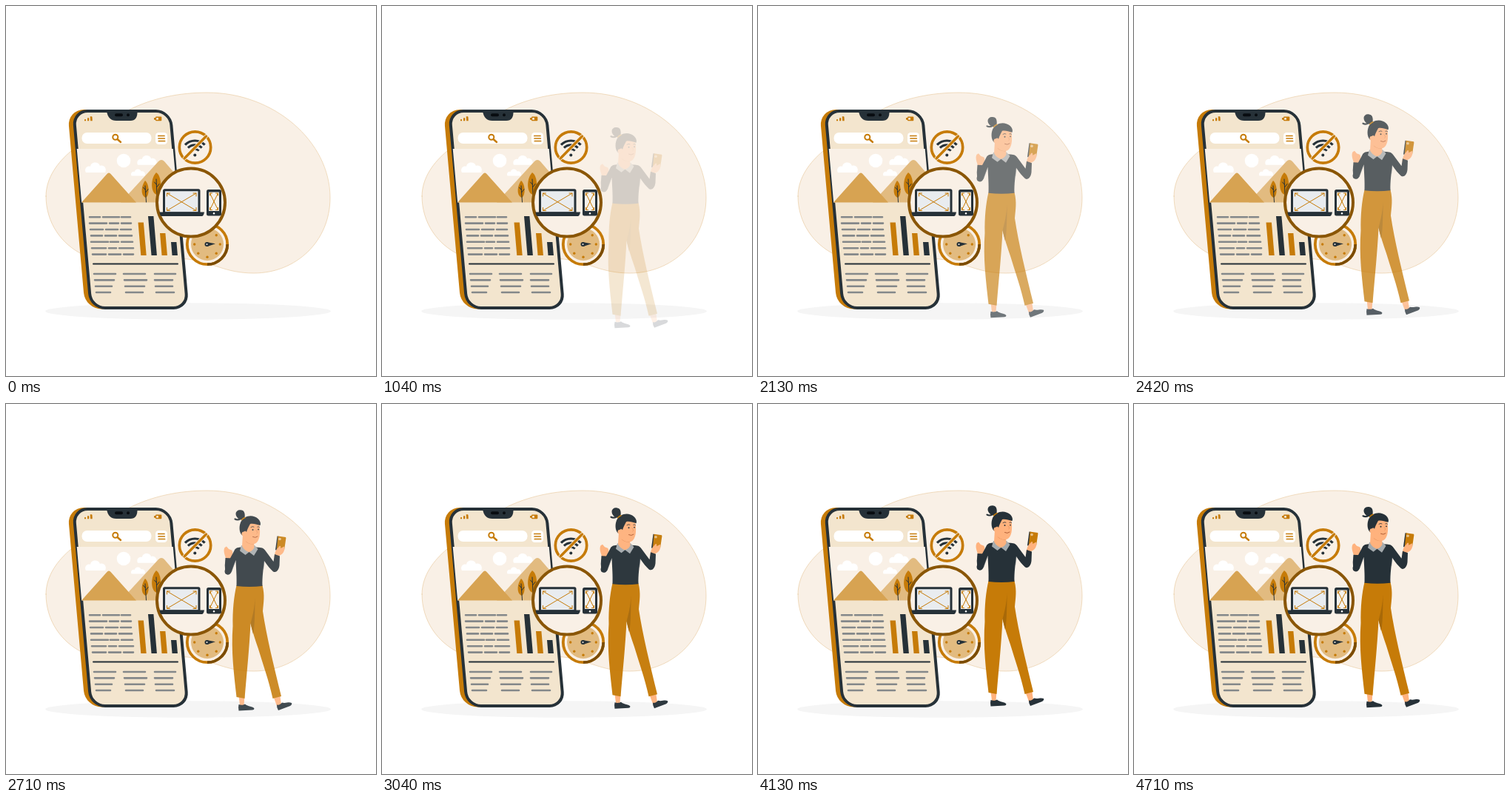
These frames come from a looping animation (500 by 500 pixels, 4750 ms). An HTML page:

```html
<!DOCTYPE html>
<html lang="en">
<head>
<meta charset="utf-8">
<title>Mobile site</title>
<style>
html, body { margin: 0; width: 100%; height: 100%; overflow: hidden; background: #fff; }
svg { display: block; width: 100vw; height: 100vh; }
</style>
</head>
<body>
<svg id="stage" viewBox="0 0 500 500" fill="none" stroke-linecap="round" stroke-linejoin="round"></svg>
<script>
const ORANGE = '#c67b08', DARK = '#263138', BROWN = '#8a5606', TAN = '#e2bb80',
      CREAM = '#f9f0e6', SAND = '#f3e5ce', GREY = '#84888a', SKIN = '#ffb27d';
const SKEW = 'matrix(1 0 .089 1 -12.46 0)';

const shape = (d, fill, extra = '') => `<path d="${d}" fill="${fill}" ${extra}/>`;
const line = (d, color, width, extra = '') =>
  `<path d="${d}" stroke="${color}" stroke-width="${width}" ${extra}/>`;
const disc = (x, y, r, fill, extra = '') => `<circle cx="${x}" cy="${y}" r="${r}" fill="${fill}" ${extra}/>`;
const ring = (color, width) => `stroke="${color}" stroke-width="${width}"`;
const box = (x, y, w, h, r, fill, extra = '') =>
  `<rect x="${x}" y="${y}" width="${w}" height="${h}" rx="${r}" fill="${fill}" ${extra}/>`;

// Rows of dashes: each row is a list of start/end pairs.
const dashes = (rows, top, gap) => line(rows.map((row, i) => {
  let d = '';
  for (let k = 0; k < row.length; k += 2) d += `M${row[k] + 1} ${top + i * gap}H${row[k + 1] - 1}`;
  return d;
}).join(''), GREY, 2.6);

const bar = (x, top, fill) =>
  shape(`M${x} ${top}h7.4L${x + 7.4 + (337 - top) * .085} 337h-7.4Z`, fill);

const cloud = (x, y, s) => `<g transform="translate(${x} ${y}) scale(${s})">` +
  shape('M-13 6C-16 1-11-4-7-2C-6-9 4-9 6-3C11-5 16 1 13 6Z', '#fff') + '</g>';

const tree = (x, top, bottom, w) => {
  const h = bottom - top, mid = top + h * .55;
  return shape(`M${x} ${top}C${x + w} ${top + 5} ${x + w} ${bottom - 3} ${x + 1} ${bottom}` +
    `C${x - w} ${bottom - 2} ${x - w} ${top + 8} ${x} ${top}Z`, ORANGE) +
    line(`M${x} ${top + h * .3}L${x + 1.5} 265M${x + .5} ${mid}l-3-3.5M${x + 1} ${mid + 3}l3-4`, DARK, 1);
};

// Both diagonals of a rectangle, with small arrowheads at the corners.
const diagonals = (l, t, r, b, a) => line(
  `M${l} ${t}L${r} ${b}M${r} ${t}L${l} ${b}` +
  `M${l} ${t + a}V${t}H${l + a}M${r - a} ${t}H${r}V${t + a}` +
  `M${l} ${b - a}V${b}H${l + a}M${r - a} ${b}H${r}V${b - a}`, ORANGE, 1);

const backdrop = shape('M54 257C54 232 70 211 88 196C112 176 134 157 165 141C198 124 235 117 272 117' +
  'C362 117 438 183 438 259C438 318 392 361 335 361C295 361 280 346 245 342C190 338 140 350 104 336' +
  'C75 322 54 293 54 257Z', CREAM, 'stroke="#e3bd86" stroke-width=".5"') +
  '<ellipse cx="246" cy="412.5" rx="193" ry="11.3" fill="#f5f5f5"/>';

const picture = '<g clip-path="url(#screen)">' +
  shape('M90 193H240V265.5H90Z', CREAM) +
  disc(159, 209, 9.3, '#fff') + cloud(121, 219, 1) + cloud(190.5, 209, .95) + cloud(178.5, 225.5, .68) +
  shape('M155 265.5L206 210Q210 206 214 210L262 265.5Z', TAN) +
  shape('M102 265.5L136 227.500Q139 223.500 142 227.500L176 265.5Z', '#d7a352') + '</g>' +
  tree(188, 236, 259, 6) + tree(203, 225, 255, 8);

const phone = `<clipPath id="screen"><rect x="91" y="142" width="130" height="266" rx="18" transform="${SKEW}"/></clipPath>` +
  `<g transform="${SKEW}">` + box(83, 140, 130, 269.5, 22, ORANGE) +
  box(91, 142, 130.500, 266, 19, SAND, ring(DARK, 4)) + '</g>' + picture +
  shape('M136 142H177.500Q178 155 168 155H149Q138 155 136 142Z', DARK) +
  line('M149 147.300H156', '#080c10', 4) + disc(165, 147.300, 2, '#080c10') +
  line('M107.200 154.300v-.6M111.200 154.300v-2.400M115.300 154.300v-4.300', ORANGE, 2, 'stroke-linecap="butt"') +
  shape('M106 155.300v-2h2v2ZM110 155.300v-4h2.200v4ZM114.200 155.300l-.5-6h2.500l.5 6Z', ORANGE) +
  box(202, 149.500, 8.300, 5.800, 1, ORANGE) + box(200, 151, 3, 2.800, .5, ORANGE) + box(203, 151, 3, 2.800, .4, SAND) +
  box(102.500, 171, 94, 15, 7, '#fff') + disc(147.800, 177.300, 3.500, 'none', ring(ORANGE, 2)) +
  line('M150.500 180L155 184', ORANGE, 2.400) +
  box(202, 171, 16, 16, 4.500, '#fff') + line('M205.800 175.500H214M206 179H214.300M206.300 182.500H214.600', ORANGE, 1.700) +
  dashes([
    [112, 128, 130, 154, 155, 169], [112, 137, 139, 153, 155, 170], [113, 132, 134, 152, 154, 170],
    [114, 131, 133, 150, 152, 171], [114, 139, 140, 153, 155, 172], [115, 136, 138, 150, 152, 173],
    [116, 136, 138, 156, 158, 173]], 285.200, 8.400) +
  bar(178.500, 292.500, ORANGE) + bar(192, 284, DARK) + bar(208, 307, ORANGE) + bar(223, 319, DARK) +
  line('M118 348.500H232', DARK, 2) +
  dashes([
    [118, 149, 158, 189, 200, 230], [119, 147, 159, 191, 200, 226],
    [120, 144, 160, 188, 201, 226], [121, 142, 161, 186, 202, 228]], 362, 8.350);

const arc = (r, w) => {
  const k = r * .72;
  return line(`M${255.300 - k} ${201 - k}A${r} ${r} 0 0 1 ${255.300 + k} ${201 - k}`, DARK, w, 'stroke-linecap="butt"');
};
const noWifi = disc(255.500, 191, 21.200, CREAM, ring(ORANGE, 3.700)) +
  arc(18.500, 3.200) + arc(13, 3) + arc(7.500, 2.800) + disc(255.300, 201.500, 2, DARK) +
  line('M241 206L270.500 176', CREAM, 5) + line('M241 206L270.500 176', ORANGE, 3.400);

let ticks = '';
for (let i = 0; i < 8; i++) {
  const a = i * Math.PI / 4;
  ticks += disc(272 + 17.300 * Math.cos(a), 322 + 17.300 * Math.sin(a), 1.700, ORANGE);
}
const gauge = disc(272, 322, 27.200, CREAM, ring(ORANGE, 3.800)) +
  line('M299.200 322A27.200 27.200 0 0 1 272 349.200', '#7b4c04', 3.800, 'stroke-linecap="butt"') +
  disc(272, 322, 22, TAN) + ticks +
  shape('M271 319L283 321.200L272 325Z', DARK) + disc(271.500, 322, 3, DARK) + disc(271.500, 322, 1, CREAM);

const lens = disc(250, 265.600, 46, CREAM, ring(BROWN, 4)) +
  box(213.500, 248.800, 47.500, 31, 1, '#e9ecef', ring(DARK, 3)) + diagonals(217.500, 253, 257, 276.500, 4) +
  shape('M207.500 278.500H268Q267 284 264.500 284H210.500Q208 284 207.500 278.500Z', DARK) +
  box(271, 248, 20, 35.500, 2.500, DARK) + box(274, 251.500, 14, 25.500, .5, '#f4f1ec') +
  diagonals(275.500, 253, 286.500, 275.500, 3) + disc(281, 280.200, 1.200, '#fff');

const woman =
  // feet
  shape('M314.500 390H322.500L321.500 403H316Z', SKIN) + shape('M360.500 389L370 388L372 402L366 404Z', SKIN) +
  shape('M314.500 402C318 403 320 403 323 401.500C327 405 334 404.500 335.500 407.500Q335.500 409.500 333 409.500L314.500 410.500Q313.500 406 314.500 402Z', DARK) +
  shape('M366 402.500C369 403 371 402 373 399.500C378 401 382 398 386 400Q387 402 384 404L368 410Q365.500 406 366 402.500Z', DARK) +
  // trousers
  shape('M311.500 241H346.500C350 255 348 264 347 276C352 310 362 350 372 391L360.500 394C355 369 347 347 341 327C337 315 333 304 330.500 292C329 325 325 362 322.500 394L311.500 392C308 360 304 330 306.500 296C306 275 308 256 311.500 241Z', ORANGE) +
  shape('M336.500 257C336 273 333 282 330.500 293L334 307C336 300 336.500 276 336.500 257Z', '#a86908') +
  // hands and device
  shape('M297 205C296 200 293 195 295.500 190L298 188.500L301 192L305 193.500C308 197 305 201 303.500 206Z', SKIN) +
  shape('M366.500 174.500L364 193L366 194.500L369 175Z', DARK) +
  shape('M367.500 174.500L378 176Q378.500 176.500 378.300 178L376 193.500L365.800 193.500Z', ORANGE) +
  disc(370, 178.500, 1.800, '#e9c38a') +
  shape('M362.500 203C363 197 365 192 368 190C370 186 372 188 371 191L376 188.500C377 194 375 199 369 201L369 206Z', SKIN) +
  // top
  shape('M317 189.500C312 190 310 191 308.500 194C304 203 297 214 295.500 222C295.500 228 303 228 304.500 223L310.500 207' +
    'C311 220 312 230 311.500 242Q329 244 346.500 242C346 230 348 217 349 208C353 214 357 219 361 222.500C366 225 369 219 369.500 214L370 201.500L363 199L361.500 209L350 193.500C347 189.500 343 190 338 189.500Z', DARK) +
  shape('M296.500 204L305.500 204.500L304.500 223Q301 228 296.500 225Q295 214 296.500 204Z', DARK) +
  line('M305 222L309.500 209', '#46525a', .5) + line('M349 208L347.800 219', '#46525a', .5) +
  // collar and neck
  shape('M318 187L316 194.500L323.500 200L328.500 196L335 201L340.500 192L336 187Z', '#a5abae') +
  shape('M320 172L335 180L335.500 190Q333 195 328 196Q322 194 319 188Z', SKIN) +
  shape('M323.500 181.500Q328 186 334.700 185.500L334.500 180Z', '#e8945f') +
  // head
  shape('M320 158C326 150 341 151 342.500 160C344 171 343 181 337 184.500C329 187 322 182 320.500 174Z', SKIN) +
  shape('M320.500 174C315 172 314.500 162 317 156C321 147 333 144.500 340.500 151C344 154 344.500 158 343.500 160C338 158 333 157 330 158C328 162 326 165 325 169Q323 166 321.500 169Z', DARK) +
  disc(321.500, 171.500, 3, SKIN) +
  shape('M311 147C309 141 314 138 318.500 139.500C323 140 323.500 147 322 151C319 154 313 152 311 147Z', DARK) +
  line('M317 151Q313 153.500 309.500 151.500', DARK, 2.200) + line('M318.500 152.500Q321 150 323 149.500', ORANGE, 1.500) +
  disc(333.500, 166, 1, DARK) + disc(341, 165.500, .9, DARK) +
  line('M331 162.500Q333 160.800 335 162M339.800 162Q341 161.200 342.500 162.300', DARK, .8) +
  line('M338 166.500Q341 170 338.800 171', '#e8945f', .8) +
  line('M333.500 175.500Q337 177.500 340 175', '#a8552e', .9);

const stage = document.getElementById('stage');
stage.innerHTML = backdrop + phone + noWifi + gauge + lens + `<g id="woman">${woman}</g>`;
const figure = document.getElementById('woman');

const LOOP = 4750, STEP = 1000 / 24, RISE = 30, APPEAR = 660;

const bezier = (s, a, b) => 3 * (1 - s) ** 2 * s * a + 3 * (1 - s) * s * s * b + s ** 3;
function ease(x) {
  let lo = 0, hi = 1;
  for (let i = 0; i < 24; i++) {
    const mid = (lo + hi) / 2;
    if (bezier(mid, .36, .5) < x) lo = mid; else hi = mid;
  }
  return bezier(lo, -.01, 1.38);
}

function draw(ms) {
  const t = Math.floor((ms % LOOP) / STEP + .05) * STEP;
  const p = ease(Math.min(t / LOOP, 1));
  figure.setAttribute('opacity', t < APPEAR ? 0 : Math.min(p, 1));
  figure.setAttribute('transform', `translate(0 ${RISE * (1 - p)})`);
}

const start = performance.now();
function tick() {
  draw(performance.now() - start);
  requestAnimationFrame(tick);
}
tick();
</script>
</body>
</html>
```
